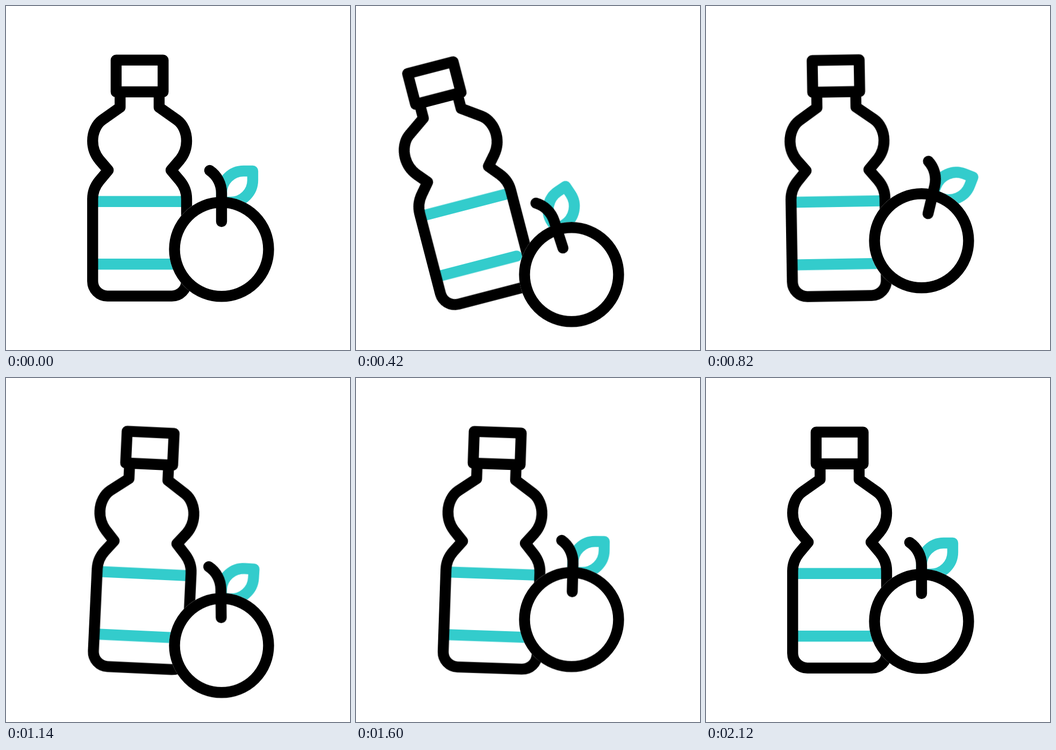
Animation, 640 px wide and 640 px high, one loop 2.4 s. Source, as an HTML page without scripts:

```html
<!DOCTYPE html>
<html lang="en">
<head>
<meta charset="utf-8">
<title>Bottle and fruit</title>
<style>
  html, body { margin: 0; width: 100%; height: 100%; overflow: hidden; background: #fff; }
  svg { display: block; width: 100vw; height: 100vh; }
  .line { fill: none; stroke: #000; stroke-width: 20.4; stroke-linecap: round; stroke-linejoin: round; }
  .teal { stroke: #33cccc; }

  .bottle, .fruit, .top, .leaf {
    animation: 2400ms cubic-bezier(.333, 0, .667, 1) infinite;
  }
  .bottle { transform-origin: 248.6px 539.6px; animation-name: rock; }
  .fruit { animation-name: bounce; }
  .top { transform-origin: 401px 452.8px; animation-name: swing; }
  .leaf { transform-origin: 401px 365px; animation-name: flap; }

  @keyframes rock {
    0%, 88.333%, 100% { transform: rotate(0deg); }
    24.375% { transform: rotate(-18deg); }
    40.625% { transform: rotate(8deg); }
    55.625% { transform: rotate(-4.05deg); }
    68.333% { transform: rotate(2.25deg); }
  }
  @keyframes bounce {
    0%, 88.333%, 100% { transform: translateY(0); }
    22.917% { transform: translateY(54.4px); }
    33.542% { transform: translateY(-16.8px); }
    44.375% { transform: translateY(54px); }
    58.333% { transform: translateY(-16px); }
    77.708% { transform: translateY(15.6px); }
  }
  @keyframes swing {
    0%, 88.333%, 100% { transform: rotate(0deg); }
    22.708% { transform: rotate(-20.7deg); }
    36.125% { transform: rotate(15.5deg); }
    54.167% { transform: rotate(-7.8deg); }
    71.667% { transform: rotate(3.7deg); }
  }
  @keyframes flap {
    0%, 88.333%, 100% { transform: rotate(0deg); }
    25% { transform: rotate(-20.2deg); }
    37.75% { transform: rotate(14.3deg); }
    58.125% { transform: rotate(-7deg); }
    72.917% { transform: rotate(3deg); }
  }
</style>
</head>
<body>
<svg viewBox="0 0 640 640">
  <g class="bottle">
    <path class="line teal" d="M162 363.7H335M162 480.3H316"/>
    <path class="line" d="M212.3 162V188.5L179 212C168 220 161.2 235 161.2 251
      C161.2 264 165.5 276 173.5 286L190.2 305.5L173.5 325.3C165.5 335 161.2 346.5 161.2 359
      V512.1A27.5 27.5 0 0 0 188.7 539.6H308.5A27.5 27.5 0 0 0 336 512.1
      V359C336 346.5 331.7 335 323.7 325.3L307 305.5L323.7 286
      C331.7 276 336 264 336 251C336 235 329.2 220 318.2 212L284.9 188.5V162"/>
    <rect class="line" x="204.9" y="100.6" width="87.4" height="59.1"/>
  </g>
  <g class="fruit">
    <g class="top">
      <path class="line teal leaf" d="M459 307H442A41 41 0 0 0 401 348V365H418A41 41 0 0 0 459 324Z"/>
    </g>
    <circle cx="401" cy="452.8" r="97.7" fill="#fff"/>
    <circle class="line" cx="401" cy="452.8" r="87.5"/>
    <g class="top">
      <path class="line" d="M379 306C392.5 315 401 331 401 348V401"/>
    </g>
  </g>
</svg>
</body>
</html>
```
